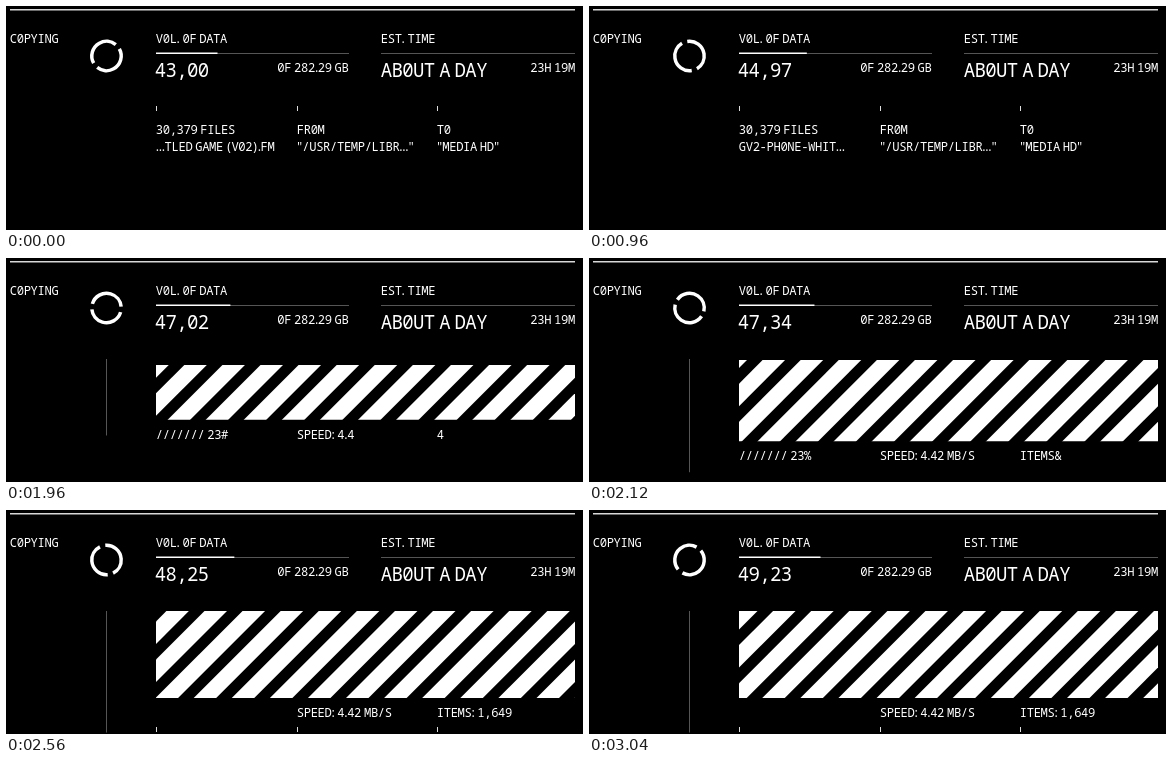
Animation of 577 by 224 pixels, one loop 3.08 s. Source, as an HTML page with a canvas:

```html
<!DOCTYPE html>
<html>
<head>
<meta charset="utf-8">
<title>Copying</title>
<style>
  html, body { margin: 0; background: #000; overflow: hidden; }
  canvas { display: block; }
</style>
</head>
<body>
<canvas id="stage" width="577" height="224"></canvas>
<script>
const ctx = document.getElementById('stage').getContext('2d');
const LOOP = 3080, STEP = 40;
const COLUMNS = [150, 291, 431];
const FILES = ['...TLED GAME (V02).FM', 'GV2-MENU-LOOP-A...', 'GV2-PHONE-BLACK...', 'GV2-PHONE-WHIT...'];
// text, time typing starts, ms per letter
const STATUS = [
  ['/////// 23%', 1700, 25],
  ['SPEED: 4.42 MB/S', 1720, 25],
  ['ITEMS: 1,649', 1950, 32]
];
const NOISE = '%#4+7/&2';

const clamp = v => Math.max(0, Math.min(1, v));

function rect(x, y, w, h, color) {
  ctx.fillStyle = color;
  ctx.fillRect(x, y, w, h);
}

// Monospaced letters with narrow punctuation; every O is a slashed zero.
function put(str, x, y, size = 12.2) {
  ctx.font = `500 ${size}px "Noto Sans Mono", "DejaVu Sans Mono", monospace`;
  ctx.textAlign = 'center';
  ctx.fillStyle = '#fff';
  for (const ch of str.replace(/O/g, '0')) {
    const w = size * (' .:'.includes(ch) ? 0.24 : '()"'.includes(ch) ? 0.45 : 0.568);
    ctx.fillText(ch, x + w / 2, y);
    x += w;
  }
}

function spinner(t) {
  const gap = (-40 + t * 0.115) * Math.PI / 180, half = 0.19;
  ctx.strokeStyle = '#fff';
  ctx.lineWidth = 3.5;
  for (const a of [gap, gap + Math.PI]) {
    ctx.beginPath();
    ctx.arc(100.5, 50, 14.7, a + half, a + Math.PI - half);
    ctx.stroke();
  }
}

function header(t) {
  rect(4, 3, 565, 1.5, '#d8d8d8');
  put('COPYING', 4, 37);
  put('VOL. OF DATA', 150, 37);
  put('EST. TIME', 375, 37);
  rect(150, 47, 193, 1, '#555');
  rect(375, 47, 194, 1, '#555');
  rect(150, 46.5, 61.5 + t * 0.00658, 1.5, '#fff');
  put((43 + t * 0.0020493).toFixed(2).replace('.', ','), 149, 71, 19);
  put('OF 282.29 GB', 271.5, 66);
  put('ABOUT A DAY', 375, 71, 19);
  put('23H 19M', 524.5, 66);
}

function tick(x, y) {
  rect(x, y, 1, 5, '#ddd');
}

function details(t) {
  const file = FILES[Math.min(3, Math.floor(t / 320))];
  const rows = [['30,379 FILES', file], ['FROM', '"/USR/TEMP/LIBR..."'], ['TO', '"MEDIA HD"']];
  rows.forEach(([title, value], i) => {
    if (t >= 1320 + i * 80) return;
    tick(COLUMNS[i], 100);
    put(title, COLUMNS[i], 127.5);
    put(value, COLUMNS[i], 144.5);
  });
}

// Diagonal bands drifting slowly to the left, anchored to the panel's top edge.
function stripes(t, top, h) {
  const width = 419, period = width / 11, white = 22.5;
  const edge = 152 - (t - 2320) * 0.03;
  const first = edge - Math.ceil((edge - 140) / period) * period;
  ctx.save();
  ctx.beginPath();
  ctx.rect(150, top, width, h);
  ctx.clip();
  ctx.fillStyle = '#fff';
  for (let x = first; x < 720; x += period) {
    ctx.beginPath();
    ctx.moveTo(x - white, top);
    ctx.lineTo(x, top);
    ctx.lineTo(x - 100, top + 100);
    ctx.lineTo(x - white - 100, top + 100);
    ctx.fill();
  }
  ctx.restore();
}

function status(t) {
  const u = clamp((t - 1780) / 460), p = 1 - (1 - u) ** 2;
  const top = 117 - 16 * p, h = 87 * p;
  rect(100, 101, 1, 121.5 * p, '#555');
  if (p > 0) stripes(t, top, h);

  STATUS.forEach(([str, start, rate], i) => {
    if (t < start || (i === 0 && t > 2000 && t % 320 < 200)) return;
    const n = Math.floor((t - start) / rate);
    const cursor = n < str.length ? NOISE[(t / STEP + Math.sign(i)) % NOISE.length] : '';
    put(str.slice(0, n) + cursor, COLUMNS[i], top + h + 19);
  });
  [2400, 2300, 2480].forEach((start, i) => {
    if (t >= start) tick(COLUMNS[i], 217);
  });
}

function draw(now) {
  const t = Math.floor(now % LOOP / STEP) * STEP;
  rect(0, 0, 577, 224, '#000');
  header(t);
  spinner(t);
  details(t);
  status(t);
}

let origin;
function animate(now) {
  origin ??= now;
  draw(now - origin);
  requestAnimationFrame(animate);
}
draw(0);
requestAnimationFrame(animate);
</script>
</body>
</html>
```
